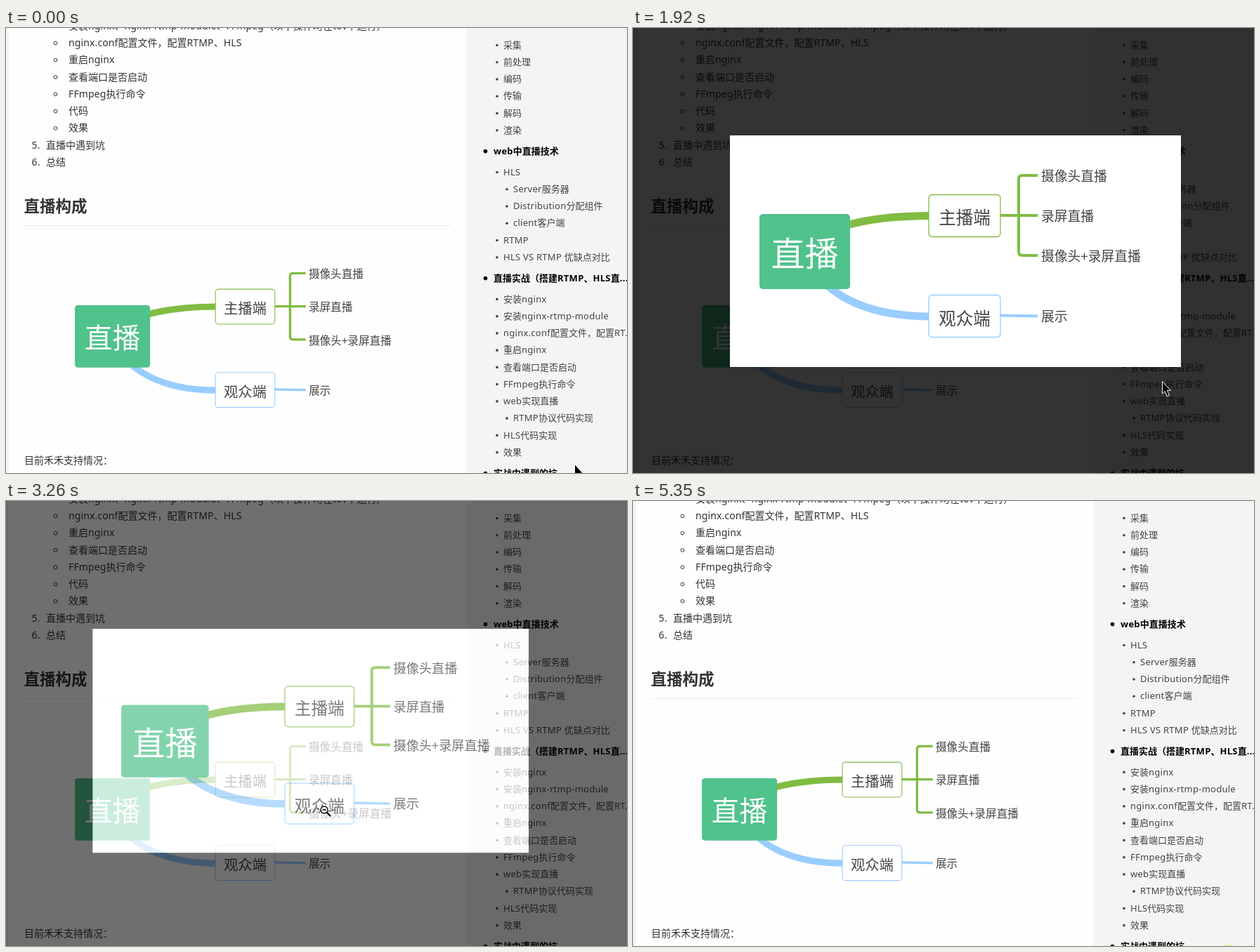
Write an HTML page that moves like this. It is 884 by 634 pixels and loops after 5500 ms.

```html
<!DOCTYPE html>
<html lang="zh-CN">
<head>
<meta charset="utf-8">
<title>直播构成</title>
<style>
html, body { margin: 0; width: 100%; height: 100%; overflow: hidden; }
body { position: relative; background: #f4f4f4; font-family: 'Noto Sans', 'Noto Sans CJK SC', sans-serif; }
svg { position: absolute; left: 0; top: 0; display: block; overflow: hidden; }
.latin { letter-spacing: .25px; }
.main { font-size: 14px; fill: #333; }
.main .latin { letter-spacing: .12px; }
.side { font-size: 13px; fill: #444; }
.side .top { font-weight: 700; fill: #000; }
.map { fill: #444; font-family: 'Noto Sans CJK SC', sans-serif; }

#popup {
  position: absolute; left: 138px; top: 153px; width: 642px; height: 330px;
  background: #fff; box-shadow: 0 0 0 1500px rgba(0, 0, 0, .8);
  transform-origin: 0 0; opacity: 0;
  animation: grow 5.5s infinite, fade 5.5s infinite;
}
@keyframes grow {
  0%, 10.82%, 50%, 55.64% { transform: translate(-75px, 149px) scale(.83); animation-timing-function: ease; }
  18.09%, 62.91% { transform: none; animation-timing-function: step-end; }
  100% { transform: none; }
}
@keyframes fade {
  0%, 11.6%, 42.6%, 56.5%, 78.91%, 100% { opacity: 0; animation-timing-function: ease; }
  18.18%, 38.18%, 63.18%, 74.91% { opacity: 1; animation-timing-function: ease; }
}

#cursor { animation: move 5.5s linear infinite; }
@keyframes move {
  0%, 1.27% { transform: translate(809px, 621px); }
  8% { transform: translate(357px, 403px); }
  10.73%, 15.27% { transform: translate(400px, 444px); }
  18.18%, 23.82% { transform: translate(663px, 549px); }
  28.73% { transform: translate(725px, 476px); }
  33.45%, 36.36% { transform: translate(753px, 503px); }
  40%, 42.55% { transform: translate(754px, 512px); }
  44.91% { transform: translate(661px, 507px); }
  49.09%, 60% { transform: translate(453px, 440px); }
  64.73%, 66.18% { transform: translate(653px, 523px); }
  70.36%, 76.36% { transform: translate(740px, 551px); }
  80.73%, 82% { transform: translate(701px, 548px); }
  88.91%, 100% { transform: translate(812px, 640px); }
}
#arrow { animation: arrow 5.5s step-end infinite; }
@keyframes arrow {
  0%, 16.5%, 29.5%, 62.7% { opacity: 1; }
  5.5%, 28%, 46.4% { opacity: 0; }
}
#lens { animation: lens 5.5s step-end infinite; }
@keyframes lens {
  0%, 16.5%, 29.5%, 62.7% { opacity: 0; }
  5.5%, 28%, 46.4% { opacity: 1; }
}
#plus { animation: plus 5.5s step-end infinite; }
@keyframes plus {
  0%, 46% { opacity: 1; }
  11.6%, 56.4% { opacity: 0; }
}
#glow { animation: glow 5.5s step-end infinite; }
@keyframes glow {
  0% { opacity: 0; }
  97.27% { opacity: 1; }
}
</style>
</head>
<body>
<svg width="884" height="634">
  <defs>
    <g id="map" class="map">
      <g fill="none" stroke-width="11">
        <path d="M165 128.5Q210 115 283 114.5" stroke="#80bc42"/>
        <path d="M117 190Q165 257 283 258" stroke="#99cdff"/>
      </g>
      <rect x="42" y="112" width="129" height="107" rx="5" fill="#50c28b"/>
      <g fill="none" stroke="#80bc42" stroke-width="4">
        <path d="M385 114H438M438 57H416Q411 57 411 62V166Q411 171 416 171H438"/>
        <path d="M385 256.5L438 257.5" stroke="#99cdff"/>
      </g>
      <g fill="#fff" stroke-width="1.3">
        <rect x="283" y="84.5" width="102" height="60" rx="5" stroke="#80bc42"/>
        <rect x="283" y="227.5" width="102" height="60" rx="5" stroke="#99cdff"/>
      </g>
      <text x="106.5" y="186" font-size="48" font-weight="300" fill="#fff" text-anchor="middle">直播</text>
      <g font-size="24.5" text-anchor="middle">
        <text x="334" y="126">主播端</text>
        <text x="334" y="269.5">观众端</text>
      </g>
      <g font-size="18.8">
        <text x="443" y="65">摄像头直播</text>
        <text x="443" y="122">录屏直播</text>
        <text x="443" y="179">摄像头+录屏直播</text>
        <text x="443" y="265">展示</text>
      </g>
    </g>
  </defs>
  <rect x="4" width="652" height="634" fill="#fefefe"/>
  <path d="M683.5 0V634" stroke="#eee"/>
  <path d="M26 281.5H634" stroke="#eaeaea"/>
  <g id="list" class="main"></g>
  <text class="main" x="25.5" y="262" style="font-size:22.5px;font-weight:700">直播构成</text>
  <text class="main" x="26" y="621">目前禾禾支持情况：</text>
  <use href="#map" transform="translate(63.2 302) scale(.83)"/>
  <g id="toc" class="side"></g>
</svg>

<div id="popup"><svg width="642" height="330"><use href="#map"/></svg></div>

<svg width="884" height="634">
  <ellipse id="glow" cx="847.5" cy="637" rx="8" ry="5" fill="#f7ee8a"/>
  <g id="cursor">
    <path id="arrow" d="M.5 .5V18L4.3 14.5 7.2 21.8 10.4 20.4 7.4 13.3H12.3Z" fill="#000" stroke="#fff"/>
    <g id="lens" fill="none" stroke-linecap="round">
      <path d="M4 4L8.5 8.5" stroke="#fff" stroke-width="4"/>
      <circle r="5" fill="#fff" stroke="#000" stroke-width="1.3"/>
      <path d="M4 4L8.5 8.5" stroke="#000" stroke-width="2.4"/>
      <path d="M-2.3 0H2.3" stroke="#000" stroke-width="1.4"/>
      <path id="plus" d="M0 -2.3V2.3" stroke="#000" stroke-width="1.4"/>
    </g>
  </g>
</svg>

<script>
const STEP = 24.25;
const byId = id => document.getElementById(id);
const label = (x, y, text, cls = '') =>
  `<text class="${cls}" x="${x}" y="${y}">` +
  text.replace(/[ -~]+/g, run => `<tspan class="latin">${run}</tspan>`) + '</text>';

const steps = [
  '安装nginx、nginx-rtmp-module、FFmpeg（以下操作均在tov下运行）',
  'nginx.conf配置文件，配置RTMP、HLS',
  '重启nginx', '查看端口是否启动', 'FFmpeg执行命令', '代码', '效果',
  '5.直播中遇到坑', '6.总结'
];
byId('list').innerHTML = steps.map((text, i) => {
  const y = -3.2 + i * STEP;
  const num = text.match(/^\d\./);
  return num
    ? label(36.5, y + 5, num[0]) + label(57, y + 5, text.slice(2))
    : `<circle cx="70.5" cy="${y + .5}" r="2.4" fill="none" stroke="#333"/>` + label(89, y + 5, text);
}).join('');

// Each leading dash is one level of depth.
const toc = [
  '-采集', '-前处理', '-编码', '-传输', '-解码', '-渲染',
  'web中直播技术',
  '-HLS', '--Server服务器', '--Distribution分配组件', '--client客户端', '-RTMP', '-HLS VS RTMP 优缺点对比',
  '直播实战（搭建RTMP、HLS直...',
  '-安装nginx', '-安装nginx-rtmp-module', '-nginx.conf配置文件，配置RT...', '-重启nginx',
  '-查看端口是否启动', '-FFmpeg执行命令', '-web实现直播', '--RTMP协议代码实现', '-HLS代码实现', '-效果',
  '实战中遇到的坑'
];
let y = 24 - STEP, wasTop = false;
byId('toc').innerHTML = toc.map(item => {
  const depth = item.match(/^-*/)[0].length;
  const top = depth === 0;
  y += STEP + (top || wasTop ? 5.6 : 0);
  wasTop = top;
  const x = 694 + depth * 14;
  return `<circle cx="${x - (top ? 11.5 : 9)}" cy="${y + .5}" r="${top ? 2.8 : 1.8}" fill="${top ? '#000' : '#444'}"/>` +
    label(x, y + 4.7, item.slice(depth), top ? 'top' : '');
}).join('');
</script>
</body>
</html>
```
